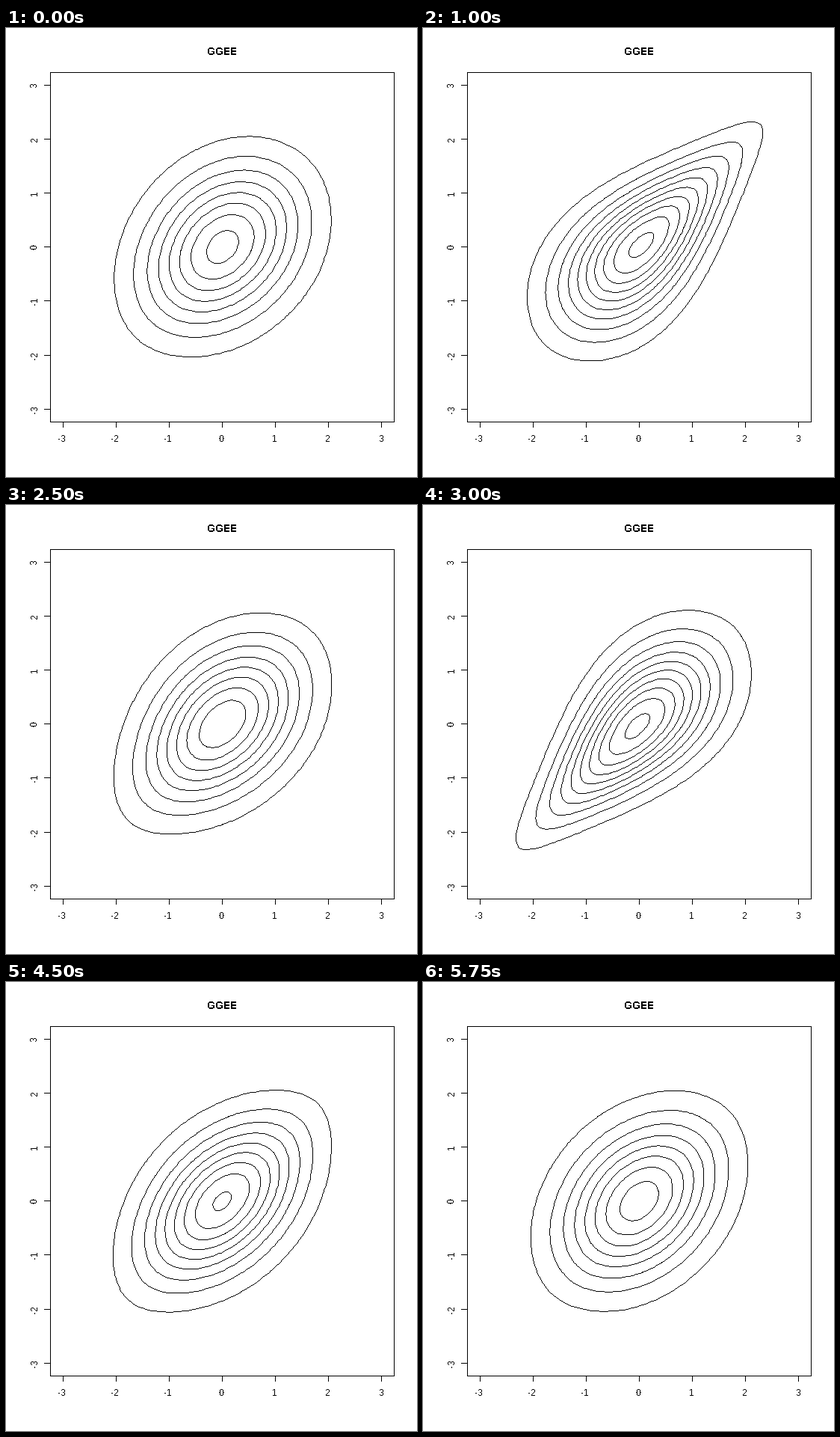
A matplotlib script for the animation above (6000 ms loop, 550x600 px).

```python
import math

import matplotlib.pyplot as plt
import numpy as np
from matplotlib.animation import FuncAnimation

plt.rcParams.update({"text.hinting": "native", "text.hinting_factor": 1,
                     "font.family": "Liberation Sans"})

W, H, DPI = 550, 600, 100
CX, CY = 289.4, 292.8              # pixel position of (0, 0)
UX, UY = 71.1, 72.148              # pixels per unit
LEFT, RIGHT, TOP, BOTTOM = 59, 519, 59, 526
FRAMES, INTERVAL = 24, 250

LEVELS = np.arange(1, 16) * 0.02
Z = np.linspace(-3, 3, 101)
PHI = np.exp(-Z**2 / 2) / math.sqrt(2 * math.pi)
CDF = np.array([0.5 * math.erfc(-z / math.sqrt(2)) for z in Z])

R = np.arange(-80, 80.1, 0.2)
X_FINE = np.arange(-30, 30.01, 0.05)
LOGISTIC_CDF = 0.5 * (1 + np.tanh((X_FINE[:, None] - R) / 2))


def density(alpha, beta):
    """GGEE copula density with standard normal margins on the grid Z x Z.

    log X_i = log(gamma ratio) + logistic noise, the ratio being shared.
    """
    mix = np.exp(alpha * R - (alpha + beta) * np.logaddexp(0, R))
    mix /= mix.sum()
    cdf = LOGISTIC_CDF @ mix
    survival = (1 - LOGISTIC_CDF) @ mix
    x = np.interp(np.log(CDF / CDF[::-1]), np.log(cdf / survival), X_FINE)
    noise = 0.25 / np.cosh((x[:, None] - R) / 2) ** 2
    margin = noise @ mix
    joint = (noise * mix) @ noise.T
    scale = PHI / margin
    return joint * np.outer(scale, scale)


def parameters(i):
    """Upper tail, lower tail, then both swing from 3 to 0.5 and back."""
    phase, step = divmod(i, 8)
    swing = 3 * (0.5 / 3) ** (min(step, 8 - step) / 4)
    return [(2, swing), (swing, 2), (swing, swing)][phase]


def draw_line(image, points):
    """One-pixel line through the points, without smoothing."""
    pts = np.floor(points).astype(int)
    for a, b in zip(pts[:-1], pts[1:]):
        n = max(abs(b - a).max(), 1)
        t = np.arange(n + 1)[:, None] / n
        cols, rows = np.floor(a + (b - a) * t + 0.5).astype(int).T
        image[rows, cols] = (0, 0, 0, 255)


fig = plt.figure(figsize=(W / DPI, H / DPI), dpi=DPI, facecolor="white")
ax = fig.add_axes([0, 0, 1, 1])
ax.set_axis_off()
base = np.zeros((H, W, 4), np.uint8)
picture = ax.imshow(base, extent=(0, W, H, 0), interpolation="nearest",
                    aspect="auto")
ax.set_xlim(0, W)
ax.set_ylim(H, 0)


def label(x, y, text, size=12, **kw):
    ax.text(x, y, text, fontsize=size * 72 / DPI, color="black",
            ha="center", va="baseline", rotation_mode="anchor",
            antialiased=False, **kw)


draw_line(base, [(LEFT, TOP), (RIGHT, TOP), (RIGHT, BOTTOM),
                 (LEFT, BOTTOM), (LEFT, TOP)])
label(CX, 36, "GGEE", 14, weight="bold")
for v in range(-3, 4):
    x, y = CX + UX * v, CY - UY * v
    draw_line(base, [(x, BOTTOM), (x, BOTTOM + 7)])
    draw_line(base, [(LEFT - 8, y), (LEFT, y)])
    label(x - 1, 553, str(v))
    label(42, y, str(v), rotation=90)


def update(i):
    image = base.copy()
    curves = ax.contour(CX + UX * Z, CY - UY * Z, density(*parameters(i)),
                        levels=LEVELS)
    for lines in curves.allsegs:
        for points in lines:
            draw_line(image, points)
    curves.remove()
    picture.set_data(image)
    return [picture]


anim = FuncAnimation(fig, update, frames=FRAMES, interval=INTERVAL,
                     repeat=True, repeat_delay=0, blit=False)
plt.show()
```
